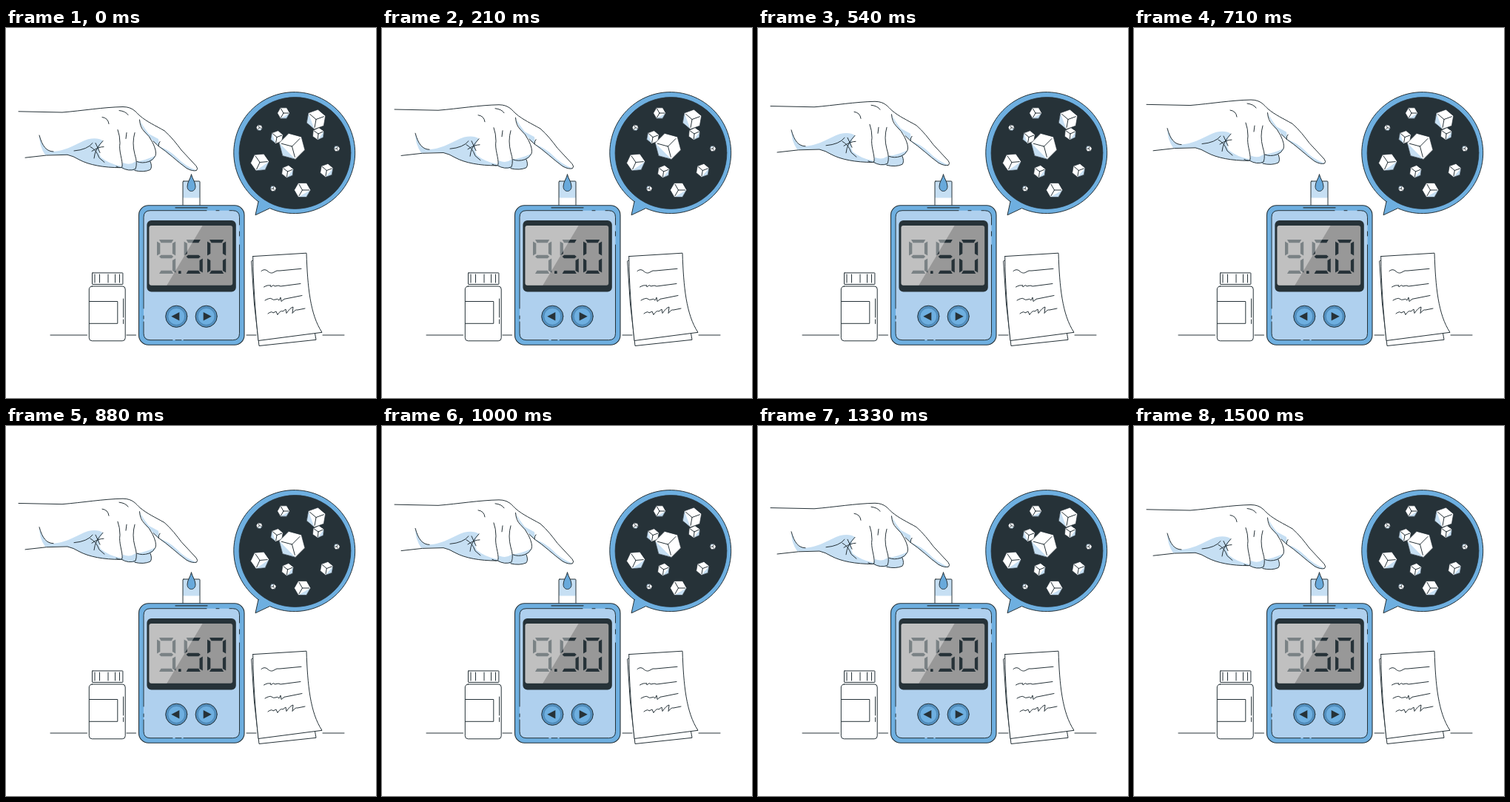
Recreate the animation shown at these times as an HTML page with a canvas. Size 500 by 500 pixels, loop 1.54 s.

```html
<!DOCTYPE html>
<html lang="en">
<head>
<meta charset="utf-8">
<title>Glucose meter</title>
<style>
  html, body { margin: 0; width: 100%; height: 100%; overflow: hidden; background: #fff; }
  canvas { display: block; width: 500px; height: 500px; }
</style>
</head>
<body>
<canvas id="stage"></canvas>
<script>
const INK = '#263238', BLUE = '#6eafe0', PANEL = '#afd0ee', SHADE = '#c6dff3', WHITE = '#fff';
const LOOP = 1540, FLOAT = 1500, STEP = 1000 / 24, LIFT = 10;

const canvas = document.getElementById('stage');
const scale = window.devicePixelRatio || 1;
canvas.width = canvas.height = 500 * scale;
const ctx = canvas.getContext('2d');

function paint(path, fill, stroke = INK, width = 1) {
  if (fill) { ctx.fillStyle = fill; ctx.fill(path); }
  if (stroke) { ctx.strokeStyle = stroke; ctx.lineWidth = width; ctx.stroke(path); }
}
const shape = (d, fill, stroke, width) => paint(new Path2D(d), fill, stroke, width);
const lines = (...paths) => paths.forEach(d => shape(d, null));

function box(x, y, w, h, r, fill, stroke, width) {
  const p = new Path2D();
  p.roundRect(x, y, w, h, r);
  paint(p, fill, stroke, width);
}
function disc(x, y, r, fill, stroke, width) {
  const p = new Path2D();
  p.arc(x, y, r, 0, Math.PI * 2);
  paint(p, fill, stroke, width);
}
function polygon(points, fill, stroke, width) {
  shape('M' + points.map(p => p.join(' ')).join('L') + 'Z', fill, stroke, width);
}

function floor() {
  lines('M60 415H109.5', 'M163 415H175.5', 'M325 415H338', 'M428 415H457');
}

function bottle() {
  box(112.3, 349, 48.9, 73.8, 4, WHITE);
  box(116.5, 330.9, 41.4, 15.5, 0.5, WHITE);
  lines('M120 333V344M126.5 333V344M138 333V344M147.5 333V344M153.5 333V344',
    'M112.5 369.5H150.8V399.3H112.5', 'M158.6 366V391M158.6 394V399.5');
}

function strip() {
  box(239, 207, 23, 36, 1, WHITE, null);
  box(239, 207, 23, 22.5, 1, SHADE, null);
  box(239, 207, 23, 36, 1, null);
  shape('M250.5 198C249 204 245 208.5 245 214.2C245 218 247.5 220.5 250.5 220.5S256 218 256 214.2C256 208.5 252 204 250.5 198Z', '#68a9db');
}

// Seven segments named a to g.
function digit(x, y, on) {
  const w = 25.2, h = 46, t = 4.3, m = h / 2;
  const across = yy => [[x + 3, yy], [x + w - 3, yy], [x + w - 5.5, yy + t], [x + 5.5, yy + t]];
  const upright = (xx, yy, dir) =>
    [[xx, yy + 2.5], [xx + dir * t, yy + 5], [xx + dir * t, yy + m - 4], [xx, yy + m - 1.5]];
  const segments = {
    a: across(y),
    b: upright(x + w, y, -1),
    c: upright(x + w, y + m, -1),
    d: [[x + 5.5, y + h - t], [x + w - 5.5, y + h - t], [x + w - 3, y + h], [x + 3, y + h]],
    e: upright(x, y + m, 1),
    f: upright(x, y, 1),
    g: [[x + 3, y + m], [x + 5.5, y + m - 2.2], [x + w - 5.5, y + m - 2.2],
        [x + w - 3, y + m], [x + w - 5.5, y + m + 2.2], [x + 5.5, y + m + 2.2]]
  };
  for (const s of on) polygon(segments[s], INK, null);
}

function meter() {
  box(179.5, 239.8, 142.5, 188.4, 13, BLUE, INK, 1.1);
  shape('M229 242.8H272', null, INK, 1.3);
  box(186, 246.7, 129.5, 175, 9, PANEL, null);
  lines('M186 379V255.7Q186 246.7 195 246.7H271', 'M284 246.7H288',
    'M302 246.7H306.5Q315.5 246.7 315.5 255.7V266', 'M315.5 275V281',
    'M315.5 293V412.7Q315.5 421.7 306.5 421.7H240', 'M229 421.7H237',
    'M225 421.7H195Q186 421.7 186 412.7V397', 'M186 389V393');

  box(190.4, 260, 120.4, 96.6, 6, INK, null);
  box(193.5, 267, 112.7, 80.8, 3, '#989898', null);
  digit(204, 286, 'abcdfg');
  box(233, 328.3, 3.6, 3.8, 0.5, INK, null);
  digit(240.6, 286, 'acdfg');
  digit(272, 286, 'abcdef');
  shape('M196.5 267H265.5L217.3 347.8H196.5Q193.5 347.8 193.5 344.8V270Q193.5 267 196.5 267Z', 'rgba(255,255,255,.39)', null);

  for (const [x, dir] of [[230.3, -1], [270.7, 1]]) {
    disc(x, 389.8, 14.6, '#538fbe');
    disc(x, 389.8, 11.4, BLUE, '#457da9', 0.6);
    polygon([[x + dir * 7, 389.8], [x - dir * 4, 384], [x - dir * 4, 395.6]], INK, null);
  }
}

function papers() {
  shape('M331.7 315.5Q334 372 342 429.5L419 421.3L416 404L340 310Z', WHITE);
  shape('M333.7 308.6L406 304.2C407.5 350 411 387 427 411.3L341 422.5C337 385 334 347 333.7 308.6Z', WHITE);
  lines('M345 328.5Q349 325 353 328C356 331 359 332 362 330Q366 327 370 328L399 325.3',
    'M348.5 350Q354 347 356 348Q358 346 358 350Q362 346 363 349Q369 347 371 349L398 345.5',
    'M350 368Q357 364 359 366T364 367Q367 365 369 368L371 364L372 369.5Q376 365 380 365.5L400 361.5',
    'M354 386Q359 382 361 385L365 383L367 387.5Q371 381 374 383L378 380L379 385.5Q384 378 388 377L387 385.5Q391 380 394 381L404 379');
}

// A hexagon with three ridges; turn sets the ridges, shaded picks a face.
function cube(x, y, r, turn, shaded) {
  const at = (i, d = r) => {
    const a = (turn + i * 60) * Math.PI / 180;
    return [x + d * Math.cos(a), y + d * Math.sin(a)];
  };
  const corners = [0, 1, 2, 3, 4, 5].map(i => at(i));
  polygon(corners, WHITE, null);
  polygon(corners.slice(shaded * 2, shaded * 2 + 3), SHADE, null);
  polygon(corners, null, INK, 0.7);
  for (const k of [0, 2, 4]) shape(`M${x} ${y}L${at(k, r * 0.82).join(' ')}`, null, INK, r > 6 ? 1 : 0.8);
}

function bubble() {
  shape('M341 234.6L337 252.8L356.5 243.6A82 82 0 1 0 341 234.6Z', BLUE);
  disc(390.5, 169, 75.4, INK, INK, 0.8);
  const cubes = [
    [375, 115, 8.3, 0, 0], [422, 143, 8.3, -25, 0], [419, 123.5, 13.5, -20, 1],
    [342.3, 134.8, 4.3, 10, 0], [366, 147.5, 8.8, -20, 1], [386.5, 160, 18, -45, 1],
    [447, 163, 4.2, 55, 1], [343, 181.5, 12.5, -5, 0], [380.5, 194, 8.5, -22, 0],
    [433.3, 192.5, 9.2, -20, 0], [361, 217, 4.1, 50, 1], [400.5, 219, 11, 0, 0]
  ];
  cubes.forEach(c => cube(...c));
}

function hand() {
  const back = 'M17 112.8L76 114C103 111.8 132 107 158 106.5C172 106.6 176 114.5 181 118.7C190 126.5 202 132 214 138.8C223 146.5 231 157 237 165L257 186.5Q260 190 257.5 192.5Q252 194 244 189.5C232 181 219 168 206 159.5';
  // skin
  shape(back + 'L200 158.5Q203 168 202 172.5Q200 177.5 195 180.5Q198 187.5 195 191.5Q186 195.5 174 192.6Q163 192.6 155 188.7C132 188.8 112 185 99 178Q91 173 83 171.3Q55 170.8 26 175.2Z', WHITE, null);
  // shadows
  shape('M45 145C49 160 55 167 64 167C85 165.5 96 155 111 150.3Q124 147.5 131 152.5Q122 163.5 128 174.5Q139 183.5 155 186.5V188.7C132 188.8 112 185 99 178Q91 173 83 171.3Q66 170.8 53 171.5Q45 160 45 145Z', SHADE, null);
  shape('M180.5 124Q185 133 193 143L206 150L207 159.5Q201 156 196 149.5Q184 139 180.5 124Z', SHADE, null);
  shape('M206 159.5Q221 165 231 175Q241 186 257.5 192.5Q250 194 243 189Q224 173 206 159.5Z', SHADE, null);
  shape('M158 182Q167 186 174 181L177 180Q188 179 202 172.5Q200 177.5 195 180.5Q198 187.5 195 191.5Q186 195.5 174 192.6Q163 192.6 155 188.7Z', SHADE, null);
  // outlines
  lines(back + 'L199 153',
    'M26 175.2Q55 170.8 83 171.3Q91 173 99 178C112 185 132 188.8 155 188.7',
    'M45 145C49 160 55 167 64 167',
    'M92 166Q110 164.5 117 155.5M114 160.5Q122 164.5 126 175.5L133 181.5M131 152.5Q120 163.5 119 176M116 166.5Q125 160.5 132 160.5M121 155.5L127 168.5',
    'M130 120.5Q138 121.5 139 129.5', 'M153 111.5Q162 112.5 165 117.5',
    'M151 137.5Q154 145.5 154 155.5C152 166.5 158 178.5 157 187.5Q155 190 149 187',
    'M174 141.5Q170 155.5 174 170.5Q178 182.5 175 190.5Q166 194.5 156 188.5',
    'M180.5 124Q181 134 187 140Q194 146 198 154.5Q204 166.5 202 172.5Q199 178.5 193 180.5Q184 183.5 177 180.5',
    'M195 180.5Q198 187.5 195 191.5Q186 195.5 174 192.6',
    'M163 141.5L162 149.5', 'M208 153.5Q206 155.5 206 159.5');
}

function draw(now) {
  const time = now % LOOP;
  const tick = Math.floor((time + 5) / STEP) * STEP;
  const phase = Math.min(tick / FLOAT, 1);
  const lift = LIFT * (1 - Math.abs(2 * phase - 1));

  ctx.setTransform(scale, 0, 0, scale, 0, 0);
  ctx.fillStyle = WHITE;
  ctx.fillRect(0, 0, 500, 500);
  ctx.lineJoin = ctx.lineCap = 'round';
  floor();
  bottle();
  papers();
  bubble();
  strip();
  meter();
  ctx.translate(0, -lift);
  hand();
}

let start;
function frame(now) {
  start ??= now;
  draw(now - start);
  requestAnimationFrame(frame);
}
draw(0);
requestAnimationFrame(frame);
</script>
</body>
</html>
```
